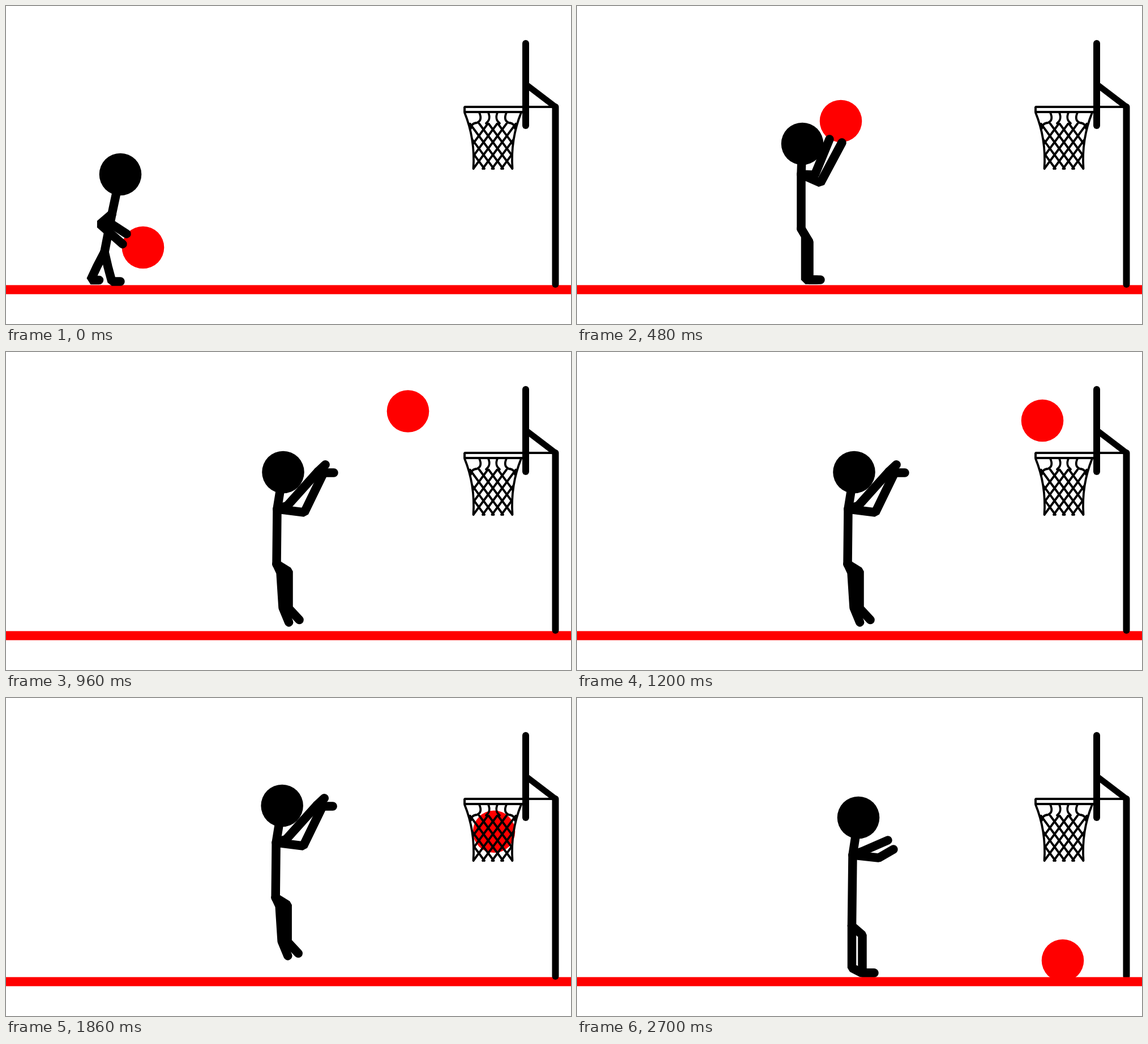
Animation of 998 by 561 pixels, one loop 2730 ms. Source, as an HTML page with a canvas:

```html
<!DOCTYPE html>
<html lang="en">
<head>
<meta charset="utf-8">
<title>Jump shot</title>
<style>
  html, body { margin: 0; width: 100%; height: 100%; overflow: hidden; background: #fff; }
  canvas { display: block; width: 998px; height: 561px; }
</style>
</head>
<body>
<canvas id="stage" width="998" height="561"></canvas>
<script>
const ctx = document.getElementById('stage').getContext('2d');
const LOOP = 2730, HEAD = 37.3, LIMB = 15.5, RED = '#f00';
const SHOT = 6, GAP = 13, DROP = 14, FALL = 17, REST = 18;

// Joints: head chest hip, elbow + hand twice, knee + ankle twice, then foot length and tilt
const pose = text => text.match(/[\d.]+/g).map(Number);
const WALK = pose('202,297 187,367 174,434  176,378 213,402  166,385 206,420  161,459 149.5,483.5  180,460 187,486  15 0');
const AIM = pose('398,243 396,297 396,393  420,298 446,235  430,312 468,241  403.5,406 403.5,483  410,416 410,483  20 0');
const SHOOT = pose('489.5,212 479,277 478,374  497,271 551,211  527,283 561,213  485,389 489,451  499,387 499,452  28 1');
const LAND = pose('497,211 487,277 485.5,402  503,271 549,251  533,282 559,267  485.5,476 503,485  504,418 504,485  21 0');

const mix = (a, b, k) => a.map((v, i) => v + (b[i] - v) * k);

function stepAt(t) {
  return Math.floor(t < 1680 ? t / 120 : DROP + (t - 1680) / 180);
}

function ballAt(i) {
  if (i < 4) return mix([242, 426], [466, 203], i / 4);
  if (i < SHOT) return mix([466, 203], [598, 168], (i - 4) / 2);
  if (i < 10) {
    const k = (i - SHOT) / 4, [x, y] = mix([598, 168], [822, 121], k);
    return [x, y - 40 * Math.sin(Math.PI * k)];
  }
  if (i < DROP) return mix([822, 121], [864, 179], (i - 10) / 4);
  return [Math.max(858, 864 - 2 * (i - DROP)), Math.min(463, 179 + 56.8 * (i - DROP))];
}

function poseAt(i) {
  if (i >= REST) return LAND;
  if (i >= 4) return mix(AIM, SHOOT, Math.min(1, (i - 4) / 2));
  return mix(WALK, AIM, i / 4);
}

function disc([x, y], color) {
  ctx.fillStyle = color;
  ctx.beginPath();
  ctx.arc(x, y, HEAD, 0, 7);
  ctx.fill();
}

function line(width, ...pts) {
  ctx.lineWidth = width;
  ctx.beginPath();
  pts.forEach(p => ctx.lineTo(...p));
  ctx.stroke();
}

function drawFigure(i) {
  const p = poseAt(i), joint = n => p.slice(2 * n, 2 * n + 2);
  const [head, chest, hip] = [0, 1, 2].map(joint);
  const [length, tilt] = joint(11);
  // Hang in the air, then sink
  const hop = i >= DROP && i < REST ? 17 * Math.abs(i - 15) - 22 : 0;
  // The feet pass each other between the standing poses
  const stride = i < 4 ? 10 * Math.sin(i * Math.PI / 2) : 0;

  ctx.save();
  ctx.translate(hop / 12, hop);
  line(LIMB, head, chest, hip);
  disc(head, '#000');
  [1, -1].forEach((side, n) => {
    const elbow = joint(3 + 2 * n), hand = joint(4 + 2 * n);
    line(LIMB, chest, elbow, hand);
    if (i > SHOT && i < REST) {
      const a = n ? 0 : -0.75;
      line(LIMB, hand, [hand[0] + 18 * Math.cos(a), hand[1] + 18 * Math.sin(a)]);
    }
    const knee = joint(7 + 2 * n), [x, y] = joint(8 + 2 * n);
    const ax = x + side * stride, a = tilt * (1 + 0.18 * side);
    line(LIMB, hip, knee, [ax, y], [ax + length * Math.cos(a), y + length * Math.sin(a)]);
  });
  ctx.restore();
}

const NET_EDGE = 'M810 188C821 215 828 250 825.5 287';
const NET_SIDE = new Path2D(NET_EDGE);
const NET_AREA = new Path2D(NET_EDGE + 'V290H894V287C891 250 898 215 911 188V206H810Z');
const CURLS = new Path2D(`M836 188C841 199 837 204 832 206C825 206 821 211 821 216
  M852 188C856 198 853 203 848 207`);

// Runs fn as it is and once more mirrored about the middle of the net
function mirrored(fn) {
  ctx.save();
  fn();
  ctx.translate(1720, 0);
  ctx.scale(-1, 1);
  fn();
  ctx.restore();
}

function drawNet() {
  ctx.lineWidth = 3.8;
  mirrored(() => { ctx.stroke(NET_SIDE); ctx.stroke(CURLS); });
  ctx.save();
  ctx.clip(NET_AREA);
  mirrored(() => {
    for (let x = 786; x < 875; x += 16.5) line(3.8, [x, 207], [x + 59, 287]);
  });
  ctx.restore();
}

function drawHoop() {
  line(11, [918, 138], [970.5, 178]);
  line(12, [970.5, 178], [970.5, 491]);
  line(12, [918, 66], [918, 211]);
  line(4, [970, 178], [810, 178], [810, 187], [912, 187]);
  drawNet();
}

function drawGround() {
  ctx.fillStyle = RED;
  ctx.fillRect(0, 492.4, 998, 16);
}

function draw(i) {
  ctx.fillStyle = '#fff';
  ctx.fillRect(0, 0, 998, 561);
  ctx.lineCap = 'round';
  ctx.lineJoin = 'bevel';
  if (i < FALL) drawGround();
  if (i !== GAP) disc(ballAt(i), RED);
  drawFigure(i);
  if (i > REST) drawHoop();
  if (i >= FALL) drawGround();
  if (i <= REST) drawHoop();
}

const start = performance.now();
let shown = -1;
function tick(now) {
  const i = stepAt(Math.max(0, now - start) % LOOP);
  if (i !== shown) draw(shown = i);
  requestAnimationFrame(tick);
}
tick(start);
</script>
</body>
</html>
```
